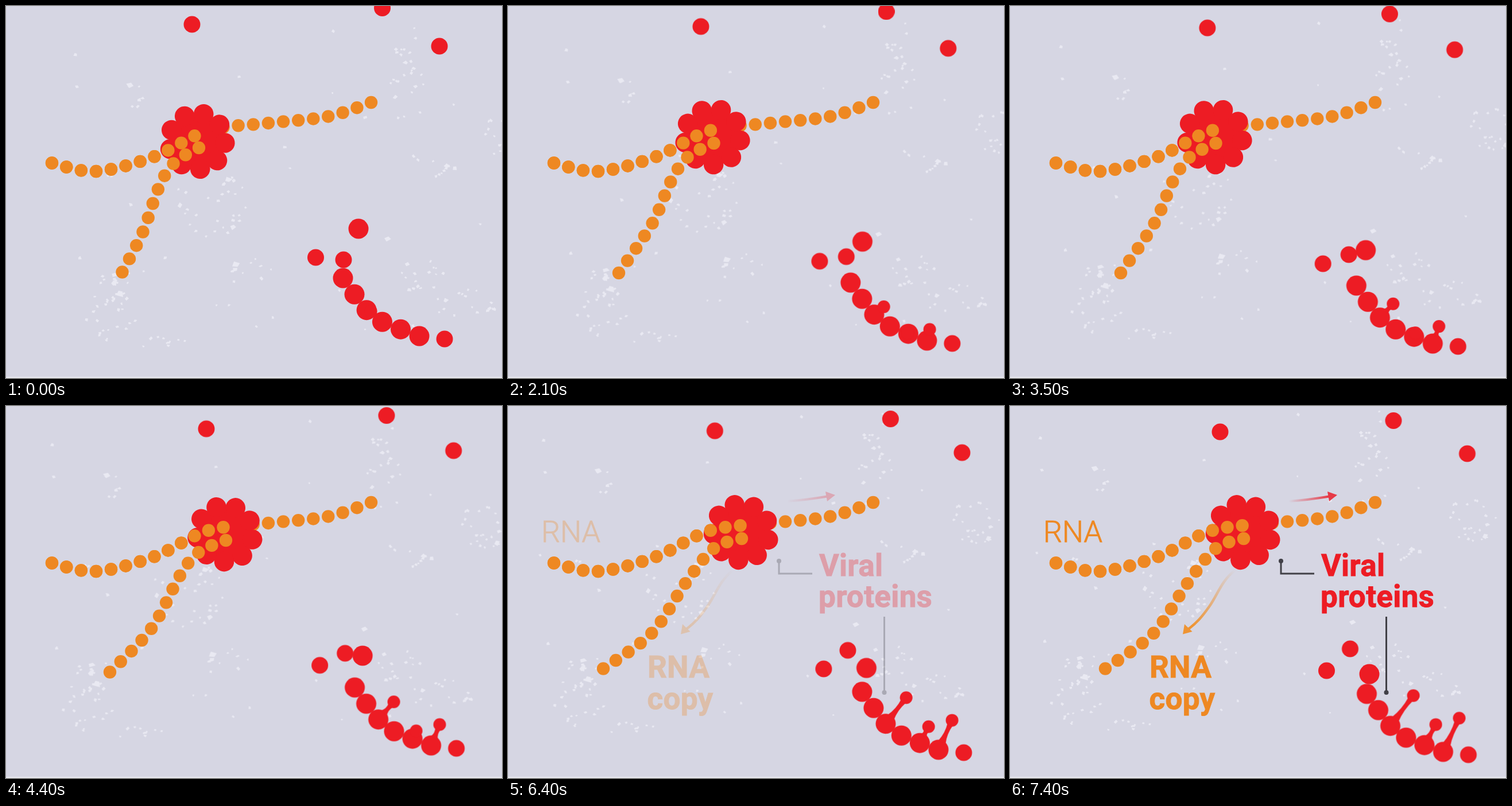
Write an HTML page that moves like this. It is 864 by 648 pixels and loops after 8000 ms.

```html
<!DOCTYPE html>
<html lang="en">
<head>
<meta charset="utf-8">
<title>RNA copying</title>
<style>
  html, body { margin: 0; width: 100%; height: 100%; overflow: hidden; background: #d6d6e3; }
  svg { display: block; }
  .drift { animation: drift 8s steps(74) infinite; }
  .labels { animation: fade 8s steps(10) infinite; }
  .red { fill: #ed1c24; stroke: #ed1c24; }
  .orange { fill: #ee8822; stroke: #ee8822; }
  circle, path { stroke: none; }
  .speck { fill: #e9e9f2; }
  .lead { fill: none; stroke: #414047; stroke-width: 3; }
  text { font: 700 53px Roboto, "Liberation Sans", sans-serif; letter-spacing: 0.3px; stroke-width: 0.9; }
  .light { font-weight: 300; font-size: 52px; letter-spacing: 0; }
  @keyframes drift {
    from { transform: translate(0, 0); }
    92.5%, to { transform: translate(var(--dx), var(--dy)); }
  }
  @keyframes fade {
    0%, 76.25% { opacity: 0; }
    88.75%, to { opacity: 1; }
  }
</style>
</head>
<body>
<svg id="stage" width="864" height="648" viewBox="0 0 864 648">
  <defs>
    <linearGradient id="redFade" gradientUnits="userSpaceOnUse" x1="486" y1="166" x2="556" y2="157">
      <stop offset="0" stop-color="#e63946" stop-opacity="0"/>
      <stop offset="1" stop-color="#e63946"/>
    </linearGradient>
    <linearGradient id="orangeFade" gradientUnits="userSpaceOnUse" x1="392" y1="286" x2="318" y2="383">
      <stop offset="0" stop-color="#ee9433" stop-opacity="0"/>
      <stop offset="1" stop-color="#ee9433"/>
    </linearGradient>
  </defs>
  <rect width="864" height="648" fill="#d6d6e3"/>
  <g id="specks" class="drift speck" style="--dx:-68px;--dy:-29px"></g>
  <rect y="646" width="864" height="2" fill="#ebebf2"/>
  <g id="floaters" class="red"></g>
  <g id="chain" class="drift red" style="--dx:34.5px;--dy:27.5px"></g>
  <g id="strandBack" class="orange"></g>
  <g id="enzyme" class="red"></g>
  <g id="strandFront" class="orange"></g>
  <g id="copy" class="orange"></g>
  <g class="labels">
    <text class="orange light" x="58" y="237">RNA</text>
    <text class="orange" x="243" y="473">RNA</text>
    <text class="orange" x="242.5" y="528">copy</text>
    <text class="red" x="542" y="296">Viral</text>
    <text class="red" x="541" y="350">proteins</text>
    <path class="lead" d="M472 270V292H530M655.5 367V499"/>
    <g fill="#414047"><circle cx="472" cy="270" r="4"/><circle cx="655.5" cy="499" r="4"/></g>
    <path d="M486 166Q520 163.500 556 157.500" style="fill:none;stroke:url(#redFade);stroke-width:4"/>
    <path d="M570 155L553 149L556 166Z" fill="#e63946"/>
    <path d="M392 286C368 305 362 328 348 348S325 378 309 390" style="fill:none;stroke:url(#orangeFade);stroke-width:4.5"/>
    <path d="M301 397.500L304 380L317.500 393Z" fill="#ee9433"/>
  </g>
</svg>
<script>
const byId = id => document.getElementById(id);
const svg = tag => document.createElementNS("http://www.w3.org/2000/svg", tag);

function add(parent, tag, attrs = {}) {
  const el = svg(tag);
  for (const key in attrs) el.setAttribute(key, attrs[key]);
  return parent.appendChild(el);
}
const dot = (parent, cx, cy, r) => add(parent, "circle", { cx, cy, r });
const show = (el, on) => el.style.display = on ? "" : "none";
const mix = (a, b, p) => a + (b - a) * p;

// Smooth curve through key points; beads sit on it at equal gaps.
function curve(keys) {
  const at = i => keys[Math.min(keys.length - 1, Math.max(0, i))];
  let d = "M" + keys[0];
  for (let i = 0; i < keys.length - 1; i++) {
    const [a, b, c, e] = [at(i - 1), at(i), at(i + 1), at(i + 2)];
    const out = b.map((v, j) => v + (c[j] - a[j]) / 6);
    const into = c.map((v, j) => v - (e[j] - b[j]) / 6);
    d += `C${out} ${into} ${c}`;
  }
  const path = svg("path");
  path.setAttribute("d", d);
  return path;
}
function spread(keys, count) {
  const path = curve(keys), gap = path.getTotalLength() / (count - 1);
  return Array.from({ length: count }, (_, i) => path.getPointAtLength(i * gap));
}

// Paper flecks: a loose scatter over the stage, plus denser patches.
let seed = 11;
function rand() {
  seed = (seed * 16807) % 2147483647;
  return seed / 2147483647;
}
function speck(x, y) {
  const turn = rand() * 6.3, size = 4 + 2.5 * rand() + 7 * rand() ** 9;
  const points = [0, 1, 2, 3].map(i => {
    const a = turn + i * 1.57 + (rand() - 0.5) * 0.7, r = size * (0.4 + rand() * 0.3);
    return (x + Math.cos(a) * r).toFixed(1) + "," + (y + Math.sin(a) * r * 0.85).toFixed(1);
  });
  add(byId("specks"), "polygon", { points: points.join(" ") });
}
for (let i = 0; i < 36; i++) speck(115 + rand() * 740, 30 + rand() * 570);

// Patch centre, radii, count
const patches = [
  [184, 540, 50, 45, 28], [270, 584, 45, 13, 9], [205, 475, 65, 18, 11],
  [355, 345, 65, 60, 28], [420, 462, 45, 28, 10], [230, 150, 18, 30, 7],
  [700, 120, 30, 100, 24], [765, 280, 25, 22, 9], [873, 228, 42, 42, 24],
  [725, 470, 45, 38, 15], [805, 520, 55, 35, 16]
];
for (const [cx, cy, rx, ry, count] of patches) {
  for (let i = 0; i < count; i++) {
    const a = rand() * 6.283, r = Math.sqrt(rand());
    speck(cx + Math.cos(a) * r * rx, cy + Math.sin(a) * r * ry);
  }
}

// Free proteins: x, y, radius, drift x, drift y
const floaters = [
  [324, 32, 14.5, 42, 13], [655.5, 3.5, 14.5, 12.5, 22], [755, 70, 14.5, 41.5, 13],
  [614, 388, 17.5, 12, 79], [539.5, 438, 14.5, 12, 23], [588, 442, 14.5, 4.5, -19]
];
for (const [x, y, r, dx, dy] of floaters) {
  const el = dot(byId("floaters"), x, y, r);
  el.setAttribute("class", "drift");
  el.style.cssText = `--dx:${dx}px;--dy:${dy}px`;
}

const links = spread([[587, 474], [627.5, 529], [655, 550], [720, 575]], 6);
for (const { x, y } of links) dot(byId("chain"), x, y, 17.5);
dot(byId("chain"), 764, 580, 14.5);

// Spikes all grow the same way out of their link, one of them later.
const spikes = [
  { base: links[2], dx: 7.5, dy: 2, delay: 0 },
  { base: links[5], dx: -4.5, dy: -4, delay: 0 },
  { base: links[4], dx: -1, dy: -1, delay: 2.7 }
];
for (const s of spikes) {
  s.stem = add(byId("chain"), "path");
  s.tip = dot(byId("chain"), 0, 0, 11);
}
function drawSpike({ base, dx, dy, delay, stem, tip }, t) {
  const age = Math.max(0, t - delay);
  const vx = dx + 4.4 * age, vy = dy - 7.4 * age;
  const len = Math.hypot(vx, vy), ux = vx / len, uy = vy / len;
  tip.setAttribute("cx", base.x + vx);
  tip.setAttribute("cy", base.y + vy);
  const at = (along, side) =>
    `${base.x + ux * along - uy * side} ${base.y + uy * along + ux * side}`;
  const near = 14, far = Math.max(near, len - 8), mid = (near + far) / 2;
  stem.setAttribute("d",
    `M${at(near, 7)}Q${at(mid, 1.5)} ${at(far, 5)}L${at(far, -5)}Q${at(mid, -1.5)} ${at(near, -7)}Z`);
}

// Template strand, threaded through the enzyme
const strand = spread([
  [80, 273.5], [157, 288], [258, 262.5], [352, 217], [456.5, 204], [561, 192.5], [636, 168]
], 23);
for (const { x, y } of strand) dot(byId("strandBack"), x, y, 11.2);
const front = strand.slice(0, 14).map(({ x, y }) => dot(byId("strandFront"), x, y, 11.2));

dot(byId("enzyme"), 0, 0, 46);
for (let i = 0; i < 9; i++) {
  const a = i * Math.PI / 4.5;
  dot(byId("enzyme"), 48.6 * Math.cos(a), 48.6 * Math.sin(a), 17.3);
}

// Key points of the copy at each stop, from tail to head
const poses = [
  [[202.5, 463.5], [238.5, 393.5], [265, 319], [292, 274], [336, 247]],
  [[193, 465], [251.5, 378.5], [283.5, 306], [313, 263], [358.5, 239]],
  [[181, 463.5], [253, 388], [303, 295.5], [336, 254.5], [383, 234]],
  [[166, 457.5], [250, 396], [309, 309], [358.5, 248], [407, 231]]
];
const beads = front.map(() => dot(byId("copy"), 0, 0, 11.2));

// Progress in stops: rest, then a quick eased hop
function hops(t) {
  let sum = 0;
  for (let i = 0; i < 3; i++) {
    const p = Math.min(1, Math.max(0, (t - 1.8 - 1.73 * i) / 0.25));
    sum += p * p * (3 - 2 * p);
  }
  return sum;
}

function drawCopying(t) {
  const h = hops(t), k = Math.min(2, Math.floor(h));
  const keys = poses[k].map((from, i) => from.map((v, j) => mix(v, poses[k + 1][i][j], h - k)));
  const path = curve(keys), gap = path.getTotalLength() / (10 + h);
  const [x, y] = keys.at(-1);
  byId("enzyme").setAttribute("transform",
    `translate(${x - 3.2 + 0.9 * h} ${y - 11.5}) rotate(${3.6 + 4.15 * h})`);
  beads.forEach((bead, i) => {
    const point = path.getPointAtLength(i * gap), on = i <= 10 + h;
    bead.setAttribute("cx", point.x);
    bead.setAttribute("cy", point.y);
    show(bead, on);
    show(front[i], on);
  });
}

let begin;
function frame(now) {
  begin ??= now;
  const t = Math.min(74, Math.floor((now - begin) % 8000 / 100)) / 10;
  for (const s of spikes) drawSpike(s, t);
  drawCopying(t);
  requestAnimationFrame(frame);
}
requestAnimationFrame(frame);
</script>
</body>
</html>
```
